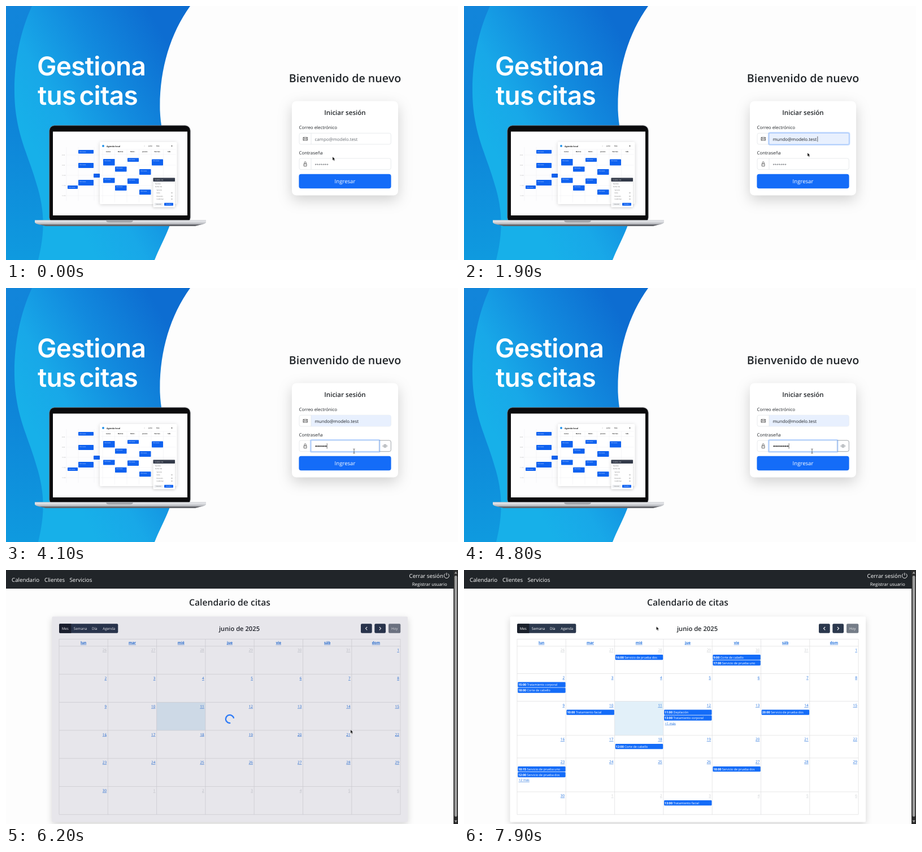
Recreate the animation shown at these times as an HTML page. Size 800 by 450 pixels, loop 8000 ms.

```html
<!DOCTYPE html>
<html lang="es">
<head>
<meta charset="utf-8">
<title>Calendario de citas</title>
<style>
html, body { margin: 0; width: 100%; height: 100%; overflow: hidden; background: #fdfdfd; }
svg { display: block; width: 800px; height: 450px; }
text { font-family: "Open Sans", "Noto Sans", sans-serif; text-rendering: geometricPrecision; }
.mid { text-anchor: middle; }
.end { text-anchor: end; }
.semi { font-weight: 600; }
.bold { font-weight: 700; }
.link { fill: #1f6fdc; text-decoration: underline; }
.hero { font: 600 46px Inter, sans-serif; letter-spacing: -.7px; word-spacing: -5px; fill: #fff; }
.field { fill: #fff; stroke: #dee2e6; stroke-width: .7; }
.ring { fill: none; stroke: #0d6efd; stroke-opacity: .25; stroke-width: 2.2; }
.edge { fill: none; stroke: #9cc3fd; stroke-width: .6; }
.icon { fill: none; stroke: #333; stroke-width: .75; }
.soft { stroke: #dee2e6; }
.eye { stroke: #6c757d; }
.card { fill: #fff; filter: drop-shadow(0 4px 6px rgba(0, 0, 0, .16)); }
.high { filter: drop-shadow(0 8px 12px rgba(0, 0, 0, .175)); }

.t { animation: 8s step-end infinite; }
.login { animation-name: login; }
.calendar { animation-name: calendar; }
.hint { animation-name: hint; }
.filled { animation-name: filled; }
.mail-focus { animation: mail-focus 8s linear infinite; }
.mail-caret { animation-name: mail-caret; }
.pass-wide { animation-name: pass-wide; }
.pass-hint { animation-name: pass-hint; }
.pass-typed { animation-name: pass-typed; }
.pass-caret { animation-name: pass-caret; }
.cover { animation: typing 8s step-end infinite; }
.idle { animation-name: idle; }
.busy { animation-name: busy; }
.loading { animation-name: loading; }
.loaded { animation-name: loaded; }
.spin { transform-origin: 396px 264px; animation: spin 8s linear infinite; }
.cursor { animation: move 8s linear infinite; }
.arrow { animation-name: arrow; }
.beam { animation-name: beam; }

@keyframes login { 0% { visibility: visible } 76.25%, 100% { visibility: hidden } }
@keyframes calendar { 0% { visibility: hidden } 76.25%, 100% { visibility: visible } }
@keyframes hint { 0% { opacity: 1 } 22.5%, 100% { opacity: 0 } }
@keyframes filled { 0% { opacity: 0 } 22.5%, 100% { opacity: 1 } }
@keyframes mail-focus { 0%, 7.5% { opacity: 0 } 9.4%, 31.25% { opacity: 1 } 33.1%, 100% { opacity: 0 } }
@keyframes mail-caret { 0% { opacity: 0 } 7.5% { opacity: 1 } 13.75% { opacity: 0 } 20% { opacity: 1 } 26.25%, 100% { opacity: 0 } }
@keyframes pass-wide { 0% { opacity: 0 } 31.25% { opacity: 1 } 39.375%, 100% { opacity: 0 } }
@keyframes pass-hint { 0% { opacity: 1 } 39.375%, 100% { opacity: 0 } }
@keyframes pass-typed { 0% { opacity: 0 } 39.375%, 100% { opacity: 1 } }
@keyframes pass-caret { 0% { opacity: 0 } 31.25% { opacity: 1 } 37.5% { opacity: 0 } 39.375% { opacity: 1 } 61.8%, 100% { opacity: 0 } }
@keyframes typing {
  0% { transform: none }
  39.375% { transform: translateX(3.45px); animation-timing-function: steps(7) }
  55.5625%, 100% { transform: translateX(27.6px) }
}
@keyframes idle { 0% { opacity: 1 } 62.5%, 100% { opacity: 0 } }
@keyframes busy { 0% { opacity: 0 } 62.5%, 100% { opacity: 1 } }
@keyframes loading { 0% { opacity: 1 } 83.75%, 100% { opacity: 0 } }
@keyframes loaded { 0% { opacity: 0 } 83.75%, 100% { opacity: 1 } }
@keyframes spin { to { transform: rotate(3960deg) } }
@keyframes move {
  0%, 1.25% { transform: translate(578px, 267px) }
  5%, 20% { transform: translate(600px, 237px) }
  22.5%, 25% { transform: translate(608px, 260px) }
  31.25%, 76.24% { transform: translate(616px, 289px) }
  76.25% { transform: translate(613px, 286px) }
  77.5% { transform: translate(610px, 283px) }
  87.5% { transform: translate(480px, 190px) }
  96.25%, 100% { transform: translate(340.5px, 100px) }
}
@keyframes arrow { 0% { opacity: 1 } 4.4% { opacity: 0 } 21% { opacity: 1 } 28% { opacity: 0 } 76.25%, 100% { opacity: 1 } }
@keyframes beam { 0% { opacity: 0 } 4.4% { opacity: 1 } 21% { opacity: 0 } 28% { opacity: 1 } 76.25%, 100% { opacity: 0 } }
</style>
</head>
<body>
<svg viewBox="0 0 800 450">
  <defs>
    <linearGradient id="wave" gradientUnits="userSpaceOnUse" x1="20" y1="205" x2="280" y2="55">
      <stop offset="0" stop-color="#17b0e9"/><stop offset=".25" stop-color="#18a8e8"/>
      <stop offset=".6" stop-color="#128ade"/><stop offset="1" stop-color="#0d6dd1"/>
    </linearGradient>
    <linearGradient id="strip" x1="0" y1="0" x2="0" y2="1">
      <stop offset="0" stop-color="#1285da"/><stop offset=".45" stop-color="#0e84d8"/><stop offset="1" stop-color="#0f9adf"/>
    </linearGradient>
    <linearGradient id="metal" x1="0" y1="0" x2="0" y2="1">
      <stop offset="0" stop-color="#c9cbd0"/><stop offset=".2" stop-color="#e6e7ea"/>
      <stop offset=".65" stop-color="#bfc1c6"/><stop offset="1" stop-color="#85878c"/>
    </linearGradient>
  </defs>

  <g class="t login">
    <rect width="800" height="450" fill="#fdfdfd"/>
    <path fill="url(#wave)" d="M0 0H326C290 50 271 115 272.5 185C275 250 305 300 300 345C297 385 277 415 263 450H0Z"/>
    <path fill="url(#strip)" d="M0 0H46C25 45 14 100 15 155C16 225 40 265 54 315C70 365 68 405 57 450H0Z"/>
    <text class="hero" x="55" y="123">Gestiona</text>
    <text class="hero" x="56" y="175">tus citas</text>

    <rect x="76.8" y="211.8" width="249.4" height="172" rx="9" fill="#0b0b0d" stroke="#76797e" stroke-width=".8"/>
    <rect x="83" y="222.5" width="238" height="148.5" fill="#fdfdfe"/>
    <g id="screen"></g>
    <path fill="url(#metal)" d="M51 379.3H354V383.5Q352 387 338 388.5H67Q53 387 51 383.5Z"/>
    <path fill="#63656a" d="M60 387.2H345L335 390H70Z"/>
    <path fill="#a3a5aa" d="M177 379.3H225Q225 383.5 219 383.5H183Q177 383.5 177 379.3Z"/>

    <text class="mid semi" x="600" y="135" font-size="19.65" fill="#212529">Bienvenido de nuevo</text>
    <rect class="card high" x="506" y="168.5" width="188" height="167" rx="8"/>
    <text class="mid semi" x="600" y="193.3" font-size="11.6" fill="#212529">Iniciar sesión</text>

    <g font-size="7.87" fill="#212529">
      <text x="518.5" y="218.3">Correo electrónico</text>
      <text x="518.5" y="263">Contraseña</text>
      <rect class="field" x="519" y="225.3" width="162.3" height="19.7" rx="3"/>
      <rect class="field" x="519" y="270" width="162.3" height="19.7" rx="3"/>
      <path class="icon" d="M526 232.8h7.4v5.2h-7.4zM526 233.2l3.7 2.6 3.7-2.6M526 237.8l2.6-2.6M533.4 237.8l-2.6-2.6"/>
      <path class="icon" d="M527.2 279.7h4.8v4h-4.8zM528.1 279.7v-2.2a1.5 1.5 0 0 1 3 0v2.2"/>

      <text class="t hint" x="546.5" y="238.7" fill="#6a6f75">campo@modelo.test</text>
      <g class="t filled">
        <path fill="#e8f0fe" d="M540 225.3h138.3a3 3 0 0 1 3 3v13.7a3 3 0 0 1-3 3H540z"/>
        <text x="546.5" y="238.7">mundo@modelo.test</text>
      </g>
      <path class="icon soft" d="M540 225.3v19.7M540 270v19.7"/>
      <g class="mail-focus">
        <rect class="ring" x="539" y="224.3" width="143.3" height="21.7" rx="3"/>
        <rect class="edge" x="540" y="225.3" width="141.3" height="19.7" rx="2"/>
      </g>
      <g class="t mail-caret" stroke="#222" stroke-width=".7">
        <path class="t hint" d="M546.8 231v9.5"/>
        <path class="t filled" d="M625.8 231v9.5"/>
      </g>

      <g class="t pass-typed" id="dots"></g>
      <g class="cover">
        <rect x="547.3" y="273" width="60" height="14" fill="#fff"/>
        <path class="t pass-caret" stroke="#222" stroke-width=".7" d="M547.4 275.2v9.5"/>
      </g>
      <text class="t pass-hint" x="546.5" y="284.2" font-size="6.3" fill="#555a60">*******</text>
      <g class="t pass-wide">
        <rect class="ring" x="539" y="269" width="143.3" height="21.7" rx="3"/>
        <rect class="edge" x="540" y="270" width="141.3" height="19.7" rx="2"/>
      </g>
      <g class="t pass-typed">
        <path d="M660.5 270h17.8a3 3 0 0 1 3 3v13.7a3 3 0 0 1-3 3h-17.8z" fill="#fff" stroke="#7d848b" stroke-width=".7"/>
        <path class="icon eye" d="M666.7 279.9q4.1-4.8 8.2 0q-4.1 4.8-8.2 0z"/>
        <circle class="icon eye" cx="670.8" cy="279.9" r="1.3"/>
        <rect class="ring" x="539" y="269" width="122.5" height="21.7" rx="2"/>
        <rect class="edge" x="540" y="270" width="120.5" height="19.7"/>
      </g>
    </g>

    <g class="mid" font-size="9.6" fill="#fff">
      <g class="t idle">
        <rect x="518.4" y="297.7" width="163.2" height="25.6" rx="4" fill="#146cf8"/>
        <text x="600" y="314.3">Ingresar</text>
      </g>
      <g class="t busy">
        <rect x="518.4" y="297.7" width="163.2" height="25.6" rx="4" fill="#669ff9"/>
        <text x="600" y="314.3">Cargando...</text>
      </g>
    </g>
  </g>

  <g class="t calendar">
    <rect width="800" height="450" fill="#fdfdfd"/>
    <rect width="792" height="33" fill="#212529"/>
    <g fill="#fff" font-size="9.75">
      <text x="10" y="20.8">Calendario</text>
      <text x="68" y="20.8">Clientes</text>
      <text x="112.5" y="20.8">Servicios</text>
      <text x="713.5" y="13.6">Cerrar sesión</text>
      <text x="718.7" y="28.3" font-size="7.8">Registrar usuario</text>
    </g>
    <path fill="none" stroke="#fff" stroke-width=".9" d="M777.3 6.5a4.4 4.4 0 1 0 5 0M779.8 4.8v5"/>
    <rect x="792" width="8" height="450" fill="#2c2c2c"/>
    <rect x="793.8" y="10" width="4.6" height="427" rx="2.3" fill="#9f9f9f"/>
    <path fill="#9f9f9f" d="M793.6 6.5h5l-2.5-4zM793.6 443.5h5l-2.5 4z"/>

    <text class="mid semi" x="396" y="62.5" font-size="15.7" fill="#212529">Calendario de citas</text>
    <rect class="card" x="81.5" y="82.5" width="629.5" height="364" rx="2"/>
    <rect x="94" y="95.3" width="104.3" height="16.5" rx="2" fill="#2b384d"/>
    <path fill="#1a202b" d="M115.3 95.3H96a2 2 0 0 0-2 2v12.5a2 2 0 0 0 2 2h19.3z"/>
    <g class="mid" font-size="6.25" fill="#fff">
      <text x="104.7" y="106">Mes</text>
      <text x="131.5" y="106">Semana</text>
      <text x="156.8" y="106">Día</text>
      <text x="182.2" y="106">Agenda</text>
      <rect x="677" y="95.3" width="21.3" height="16.5" rx="2" fill="#757d88"/>
      <text x="687.6" y="106" fill="#eee">Hoy</text>
    </g>
    <rect x="628" y="95.3" width="19.7" height="16.5" rx="2" fill="#2b384d"/>
    <rect x="652.3" y="95.3" width="19.7" height="16.5" rx="2" fill="#2b384d"/>
    <path fill="none" stroke="#fff" stroke-width="1.1" d="M639.2 100.8l-2.7 2.8 2.7 2.8M660.8 100.8l2.7 2.8-2.7 2.8"/>
    <text class="mid semi" x="413" y="108" font-size="11.2" fill="#212529">junio de 2025</text>

    <g class="t loading">
      <g id="empty"></g>
      <rect x="81.5" y="82.5" width="629.5" height="364" rx="2" fill="#140f3c" fill-opacity=".1"/>
      <g class="spin">
        <circle cx="396" cy="264" r="7.2" fill="none" stroke="#146cf8" stroke-width="2.1" pathLength="100"
          stroke-dasharray="75 25" transform="rotate(-109 396 264)"/>
      </g>
    </g>
    <g class="t loaded" id="booked"></g>
  </g>

  <g class="cursor">
    <path class="t arrow" d="M0 0V6.4L1.5 5.1 2.5 7.4 3.6 6.9 2.6 4.7H4.5Z" fill="#000" stroke="#fff" stroke-width=".35"/>
    <path class="t beam" d="M-1.6-4Q0-4 0-3Q0-4 1.6-4M0-3V3M-1.6 4Q0 4 0 3Q0 4 1.6 4" fill="none" stroke="#333" stroke-width=".7"/>
  </g>
</svg>

<script>
const put = (id, html) => { document.getElementById(id).innerHTML = html; };
const rect = (x, y, w, h, fill, more = '') =>
  `<rect x="${x}" y="${y}" width="${w}" height="${h}" fill="${fill}" ${more}/>`;
const text = (x, y, size, s, more = '') =>
  `<text x="${x}" y="${y}" font-size="${size}" ${more}>${s}</text>`;
const line = d => `<path d="${d}" fill="none" stroke="#dddddf" stroke-width=".7"/>`;

const BLUE = '#146cf8';

// Password bullets, uncovered while typing
put('dots', [...Array(8).keys()].map(i =>
  `<circle cx="${548.9 + 3.45 * i}" cy="280.3" r="1.2" fill="#222"/>`).join(''));

// Small calendar on the laptop
function laptopScreen() {
  const block = ([x, y, w, h]) => rect(x, y, w, h, '#0f62f0', 'rx=".8"') +
    text(x + 2, y + 3.6, 2.3, w > 15 ? 'Cita nueva' : '', 'fill="#fff"');
  const faint = 'stroke="#ececf0" stroke-width=".5" fill="none"';
  let out = `<path ${faint} d="M107 250V345M128 250V345M156 250V345M107 264H166M107 282H166M107 300H166M107 318H166M107 336H166"/>`;
  for (let i = 0; i < 5; i++) out += text(99, 265 + 18 * i, 2.6, `${8 + i}:00`, 'fill="#aaa"');
  out += [[128, 255, 27, 6.5], [128, 278, 27, 9], [128, 308, 27, 10], [109, 318, 18, 6], [155, 297, 11, 7]].map(block).join('');
  out += rect(166, 241, 136.5, 110, '#fff', 'rx="2" style="filter:drop-shadow(0 1px 3px rgba(0,0,0,.16))"');
  out += '<circle cx="172" cy="248" r="1.9" fill="#1c8fe8"/>';
  out += text(178, 249.6, 3.8, 'Agenda local', 'class="bold" fill="#222"');
  out += text(244.5, 249.4, 3.4, '‹', 'fill="#333"') + text(252, 249.2, 2.9, 'Junio', 'class="semi" fill="#333"') +
    text(266, 249.2, 2.9, 'Mes', 'class="semi" fill="#333"') + '<circle cx="293.5" cy="248" r=".9" fill="#444"/>';
  ['Lunes', 'Martes', 'Miérc.', 'Jueves', 'Viernes', 'Sáb.'].forEach((d, i) => {
    out += text(181 + 21.6 * i, 259.3, 2.8, d, 'class="mid bold" fill="#333"');
  });
  out += `<path ${faint} d="M168 254H301M168 263H301M168 282H301M168 300H301M168 318H301M168 336H301"/>`;
  for (let i = 0; i < 6; i++) out += `<path ${faint} d="M${171 + 21.5 * i} 254V348"/>`;
  out += [[172, 271, 20.5, 11.5], [193, 284.5, 20.5, 9], [215, 269.3, 20, 6.7], [236, 289, 20.5, 10], [258, 271.5, 20, 11],
    [172, 304.5, 20.5, 9], [193, 317.8, 20.5, 9.2], [215, 305.5, 20, 9.5], [236, 325.3, 20.5, 9]].map(block).join('');
  out += rect(260.5, 304.5, 38.5, 52, '#fff', 'rx="1" style="filter:drop-shadow(0 1px 2px rgba(0,0,0,.2))"');
  out += rect(260.5, 304.5, 38.5, 6.5, '#333a49', 'rx=".8"') + text(263.5, 308.8, 2.6, 'Detalles cita', 'fill="#fff"');
  ['Nombre', 'Fecha cita', 'Servicio', 'Hora', 'Duración', 'Confirmar'].forEach((s, i) => {
    const y = 316 + 5.4 * i;
    out += text(i < 2 ? 264 : 266.5, y, 2.6, s, 'fill="#555"');
    if (i > 2) out += text(295, y, 2.6, '00', 'class="end" fill="#555"');
  });
  out += rect(262.5, 348.8, 15, 5, '#eceef1', 'rx=".8"') + rect(280, 348.8, 16, 5, '#0f62f0', 'rx=".8"');
  return out + text(270, 352.2, 2.4, 'Cancelar', 'class="mid" fill="#555"') + text(288, 352.2, 2.4, 'Guardar', 'class="mid" fill="#fff"');
}
put('screen', laptopScreen());

// Month grid
const LEFT = 94, COL = 86.3;
const colX = c => LEFT + COL * c;

function month(tops) {
  let out = rect(colX(2), tops[2], COL, tops[3] - tops[2], '#e2f0f9');
  out += line(`M94 122.5H698.1` + tops.map(y => `M94 ${y}H698.1`).join(''));
  for (let c = 0; c < 8; c++) out += line(`M${colX(c)} 122.5V${tops[6]}`);
  ['lun', 'mar', 'mié', 'jue', 'vie', 'sáb', 'dom'].forEach((d, c) => {
    out += text(colX(c + .5), 130.8, 6.4, d, 'class="mid bold link"');
  });
  for (let i = 0; i < 42; i++) {
    const day = i < 6 ? 26 + i : i < 36 ? i - 5 : i - 35;
    const other = i < 6 || i > 35;
    out += text(colX(i % 7 + 1) - 2.2, tops[Math.floor(i / 7)] + 9.4, 6.4, day,
      other ? 'class="end link" style="fill:#8d9499" opacity=".45"' : 'class="end link"');
  }
  return out;
}

const TOPS = [135, 183.5, 232.5, 293, 333, 393, 433.2];
const A = 'Servicio de prueba uno', B = 'Servicio de prueba dos', HAIR = 'Corte de cabello',
  BODY = 'Tratamiento corporal', FACE = 'Tratamiento facial';
// row, column, slot, time, label
const events = [
  [0, 2, 0, '16:00', B], [0, 4, 0, '9:00', HAIR], [0, 4, 1, '17:00', A],
  [1, 0, 0, '15:00', BODY], [1, 0, 1, '18:00', HAIR],
  [2, 1, 0, '10:00', FACE], [2, 3, 0, '11:00', 'Depilación'], [2, 3, 1, '13:00', BODY], [2, 5, 0, '20:00', B],
  [3, 2, 0, '12:00', HAIR],
  [4, 0, 0, '10:15', A], [4, 0, 1, '12:00', B], [4, 4, 0, '18:00', B],
  [5, 3, 0, '13:00', FACE]
];
const bar = ([r, c, slot, time, label]) => {
  const x = colX(c) + 1.2, y = TOPS[r] + 15 + slot * 9.9;
  return rect(x, y, 84.4, 9.3, BLUE, 'rx="1.4"') +
    text(x + 1, y + 6.7, 5.45, `<tspan class="bold">${time}</tspan> ${label}`, 'fill="#fff"');
};
const more = (r, c, n) => text(colX(c) + 2.7, TOPS[r] + 41, 5.7, `+${n} más`, 'class="link"');

put('empty', month([...Array(7).keys()].map(i => 135 + 49.7 * i)));
put('booked', month(TOPS) + events.map(bar).join('') + more(2, 3, 1) + more(4, 0, 2));
</script>
</body>
</html>
```
